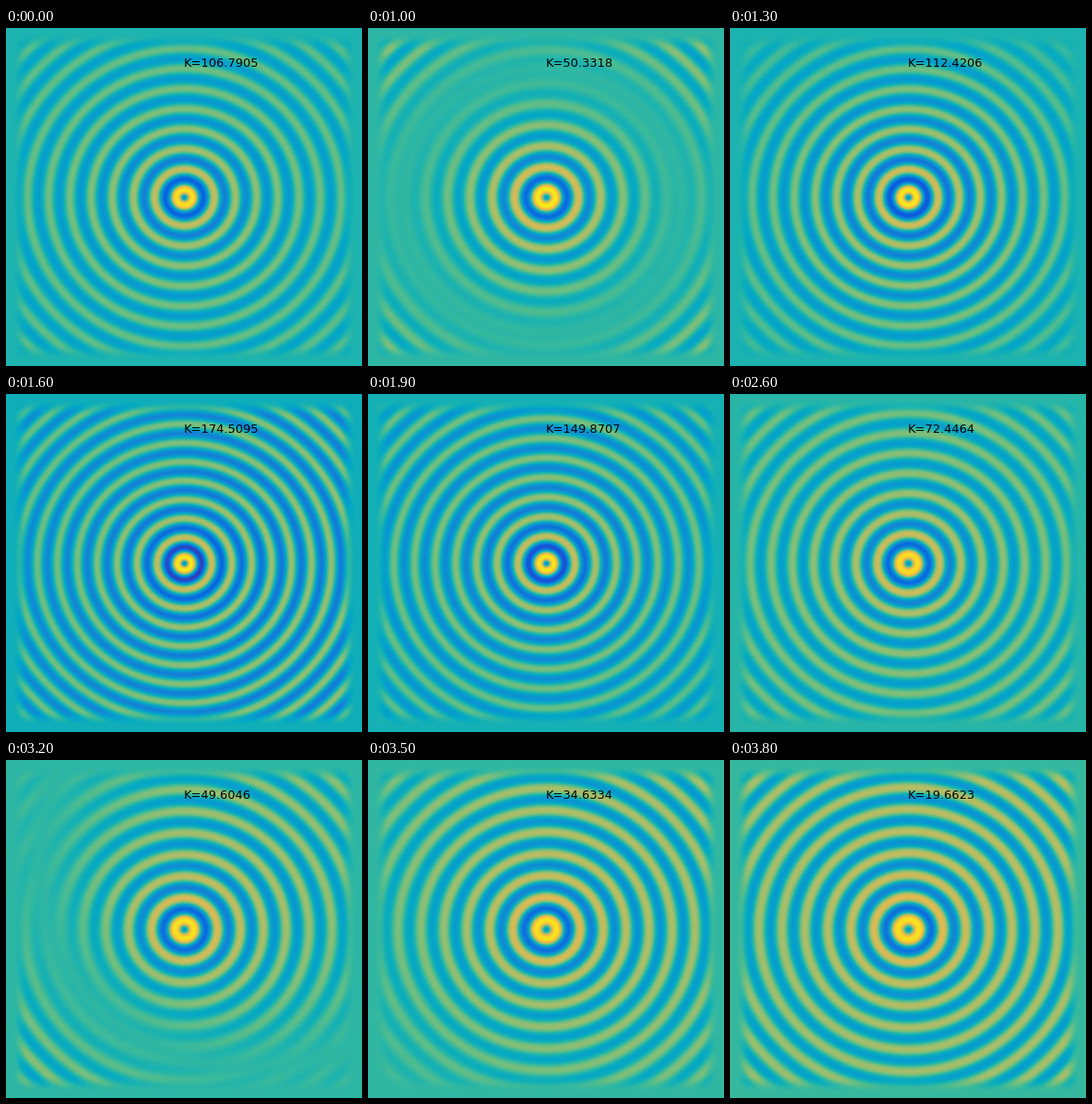
These frames come from a looping animation (386 by 366 pixels, 3.9 s). A matplotlib script:

```python
import numpy as np
import matplotlib.pyplot as plt
from matplotlib.animation import FuncAnimation
from matplotlib.colors import LinearSegmentedColormap

W, H, DPI = 386, 366, 100
STEP_MS, TICKS, HOLD = 100, 39, 10

# Blue-green-yellow ramp: position out of 63, then RGB.
RAMP = [
    (0, .208, .166, .529), (4, .196, .265, .728), (6, .125, .324, .830),
    (8, .012, .388, .882), (10, .017, .427, .879), (13, .063, .474, .855),
    (16, .079, .520, .831), (20, .034, .597, .820), (24, .023, .654, .777),
    (26, .038, .674, .744), (29, .113, .702, .686), (32, .218, .725, .619),
    (35, .348, .742, .543), (39, .530, .749, .466), (43, .683, .744, .404),
    (47, .819, .733, .350), (51, .945, .726, .289), (53, .994, .746, .240),
    (54, .999, .765, .216), (58, .970, .848, .148), (60, .959, .895, .113),
    (63, .976, .983, .054),
]
CMAP = LinearSegmentedColormap.from_list(
    "ramp", [(p / 63, rgb) for p, *rgb in RAMP], N=512)

# step, K, first ring radius, wavelength, outward gain and its x/y lean,
# beat rate and its x/y lean
KEYS = np.array([
    (0, 106.7905, 32.5, 22.95, 0.0, 0, 0, 0, 0, 0),
    (1, 50.3318, 34.8, 24.2, 0.6, 0, 0, .0066, .0003, -.0003),
    (7, 174.5095, 29.8, 21.6, 0.6, .25, .06, 0, 0, 0),
    (13, 125.2319, 32.5, 23.2, 0.2, -.1, -.1, .003, .001, .001),
    (17, 72.4464, 34.0, 23.0, 0.1, 0, 0, 0, 0, 0),
    (23, 49.6046, 36.0, 24.8, 0.5, .1, -.1, .0048, -.002, .002),
    (29, 19.6623, 37.5, 24.95, 0.55, .12, -.16, 0, 0, 0),
])


def smooth(t):
    t = np.clip(t, 0, 1)
    return t * t * (3 - 2 * t)


x, y = np.meshgrid(np.arange(W), np.arange(H))
dx, dy = x - W / 2, (y - H / 2) * W / H
r = np.maximum(np.hypot(dx, dy), 0.5)
ux, uy = dx / r, dy / r
edge = (smooth((np.minimum(x, W - 1 - x) - 6) / 18)
        * smooth((np.minimum(y, H - 1 - y) - 6) / 18))


def params(step):
    return [np.interp(step, KEYS[:, 0], col) for col in KEYS[:, 1:].T]


def field(step):
    k, first, wave, gain, gx, gy, beat, bx, by = params(step)
    base = 0.515 - 0.0005 * k
    peak = first - wave
    amp = 1.5 / np.sqrt(np.maximum(r, peak))
    amp = amp * (1 + (gain + gx * ux + gy * uy) * r / 170)
    amp = amp * np.cos(np.pi / 2 * r * (beat + bx * ux + by * uy))
    u = amp * np.cos(2 * np.pi * (np.maximum(r, peak) - first) / wave)
    # the centre is a small dip inside the brightest ring
    core = smooth(1.2 * r / peak)
    u = -0.16 * (1 - core) + u * core
    return base + u * edge, k


fig = plt.figure(figsize=(W / DPI, H / DPI), dpi=DPI)
ax = fig.add_axes([0, 0, 1, 1])
ax.axis("off")
image = ax.imshow(np.zeros((H, W)), cmap=CMAP, vmin=0, vmax=1,
                  aspect="auto", interpolation="nearest")
label = fig.text(193 / W, 1 - 42 / H, "", family="DejaVu Sans",
                 fontsize=13 * 72 / DPI, color="black", va="baseline")


def draw(tick):
    values, k = field(max(0, tick - HOLD + 1))
    image.set_data(values)
    label.set_text(f"K={k:.4f}")
    return image, label


anim = FuncAnimation(fig, draw, frames=TICKS, interval=STEP_MS,
                     repeat=True, repeat_delay=0)
plt.show()
```
